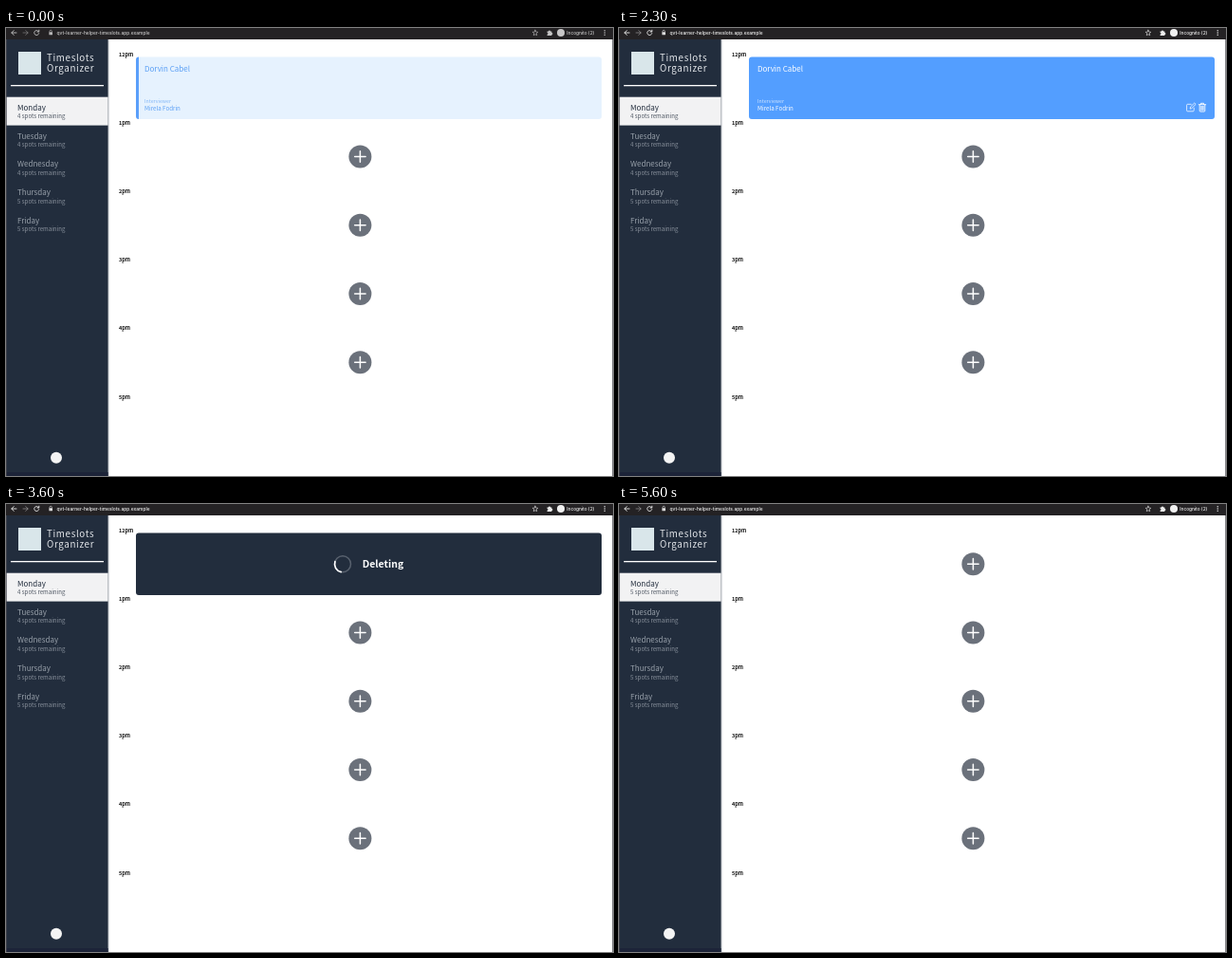
Write an HTML page that moves like this. It is 640 px wide and 472 px high and loops after 5700 ms.

```html
<!DOCTYPE html>
<html lang="en">
<head>
<meta charset="utf-8">
<title>Appointments</title>
<style>
  html, body { margin: 0; width: 100%; height: 100%; overflow: hidden; background: #fff; }
  svg { display: block; width: 640px; height: 472px; }
  text { font-family: "Noto Sans CJK JP", "Noto Sans CJK SC", "Noto Sans CJK", "Open Sans", sans-serif; }
  .chrome text { font-family: Inter, Roboto, sans-serif; font-weight: 500; fill: #f4f4f4; }
  .line { fill: none; stroke-linecap: round; stroke-linejoin: round; }
  .light { font-weight: 300; }
  .bold { font-weight: 700; }
  .hidden { display: none; }
</style>
</head>
<body>
<svg viewBox="0 0 640 472" xmlns="http://www.w3.org/2000/svg">
  <rect width="640" height="472" fill="#fff"/>

  <!-- sidebar -->
  <rect x="107" y="12" width="2.2" height="460" fill="#dfe1e4"/>
  <rect y="12" width="107.6" height="460" fill="#222d3d"/>
  <rect y="468" width="107.6" height="4" fill="#1c2338"/>
  <rect x="13" y="25" width="24" height="24" fill="#d9e6ea"/>
  <g class="light" fill="#e3e6ea" font-size="9.8" letter-spacing=".65">
    <text x="43" y="35.2">Timeslots</text>
    <text x="43" y="46.2">Organizer</text>
  </g>
  <rect x="5" y="60" width="98" height="1.3" fill="#fff"/>
  <g id="days"></g>
  <circle cx="53" cy="452.7" r="6" fill="#f4f4f4"/>
  <rect y="12" width=".7" height="460" fill="#4a4a52"/>
  <rect x="639.2" y="12" width=".8" height="460" fill="#6a6a6e"/>

  <!-- hours and free slots -->
  <g id="hours" class="bold" font-size="5.45" fill="#111"></g>
  <g id="slots"></g>

  <!-- booked -->
  <g id="booked">
    <rect id="card" x="137" y="30.5" width="491" height="65.5" rx="3"/>
    <path id="edge" d="M140 30.5v65.5a3 3 0 0 1-3-3v-59.5a3 3 0 0 1 3-3z" fill="#5a9ffa"/>
    <g id="cardText">
      <text x="146" y="46.3" font-size="8">Dorvin Cabel</text>
      <text x="146" y="79.4" font-size="5.25" class="light" opacity=".72">Interviewer</text>
      <text x="146" y="87.2" font-size="6.2">Mirela Fodrin</text>
    </g>
    <g id="tools" class="line" stroke="#fff" stroke-width=".9">
      <path opacity=".85" d="M603.2 80.3h-3.6a1 1 0 0 0-1 1v5.5a1 1 0 0 0 1 1h5.6a1 1 0 0 0 1-1v-2.6M602.2 84.8l.3-1.7 4.2-4.1 1.4 1.4-4.2 4.1z"/>
      <path id="bin" d="M611.3 80.7h7.4M613.5 80.5v-1.2h3v1.2M612.2 81v6.2a.8.8 0 0 0 .8.8h4a.8.8 0 0 0 .8-.8v-6.2M613.9 82.4v4M615 82.4v4M616.1 82.4v4"/>
    </g>
  </g>

  <!-- confirmation -->
  <g id="confirm" fill="#cf5152" text-anchor="middle">
    <g stroke="#cb5557" stroke-width=".9">
      <rect x="137.4" y="30.9" width="490.2" height="64.8" rx="2.8" fill="#fbe7e6" stroke="#b96664"/>
      <rect x="332" y="76.6" width="47.3" height="11.2" rx="5.6" fill="none"/>
      <rect x="385.6" y="76.6" width="47.3" height="11.2" rx="5.6" fill="none"/>
    </g>
    <text x="382.3" y="49.2" class="bold" font-size="10.45">Are you sure you would like to delete this appointment?</text>
    <text x="355.6" y="85.2" font-size="8">Cancel</text>
    <text x="409.2" y="85.2" font-size="8">Confirm</text>
  </g>

  <!-- deleting -->
  <g id="deleting">
    <rect x="137" y="30.5" width="491" height="65.5" rx="3" fill="#222d3d"/>
    <circle cx="355" cy="63.3" r="8.5" fill="none" stroke="#58616e" stroke-width="1.5"/>
    <path id="arc" class="line" stroke="#fff" stroke-width="1.7"/>
    <text x="375.7" y="67.1" class="bold" font-size="10.5" fill="#fff">Deleting</text>
  </g>

  <!-- browser bar -->
  <g class="chrome">
    <rect width="640" height="12" fill="#242224"/>
    <g id="bar">
      <g class="line" stroke="#eee" stroke-width=".9">
        <path d="M11 5h-5M8.2 2.6l-2.4 2.4 2.4 2.4"/>
        <path d="M18 5h5M20.8 2.6l2.4 2.4-2.4 2.4" opacity=".45"/>
        <path d="M34.4 3.7a2.5 2.5 0 1 0 .3 2M34.8 2.2v1.8h-1.8"/>
        <path d="M46 4.4v-.9a1.2 1.2 0 0 1 2.4 0v.9" stroke-width=".6"/>
        <path d="M558 2.2l.8 1.9 2 .2-1.5 1.4.4 2-1.7-1-1.7 1 .4-2-1.5-1.4 2-.2z" stroke-width=".6"/>
      </g>
      <rect x="45.4" y="4.3" width="3.6" height="3" rx=".4" fill="#ddd"/>
      <path d="M570.6 3.4h1.4a1 1 0 0 1 2 0h1.4v1.5a1 1 0 0 1 0 2v1.2h-4.8v-1.4a.9.9 0 0 0 0-1.8z" fill="#eee"/>
      <circle cx="585" cy="5" r="4" fill="#f1f1f1"/>
      <text x="53.5" y="6.7" font-size="4.9">qvt-learner-helper-timeslots.app.example</text>
      <text x="591.2" y="6.7" font-size="4.8">Incognito (2)</text>
      <g id="dots" fill="#eee"></g>
    </g>
  </g>
</svg>

<script>
const LOOP = 5700, STEP = 100;
const STEPS = [
  { at: 0, scene: 'booked', hover: false },
  { at: 800, scene: 'booked', hover: true },
  { at: 2400, scene: 'confirm' },
  { at: 3600, scene: 'deleting' },
  { at: 4800, scene: 'empty' }
];
const BIN_HOVER = 1400, FOCUS = 100;
const ROW = 72.24, SPIN = 1000;

const $ = id => document.getElementById(id);
const repeat = (n, fn) => Array.from({ length: n }, (_, i) => fn(i)).join('');

const days = [['Monday', 4], ['Tuesday', 4], ['Wednesday', 4], ['Thursday', 5], ['Friday', 5]];
$('days').innerHTML =
  '<rect y="72.7" width="107.6" height="29.9" fill="#f2f2f3"/>' +
  repeat(days.length, i => {
    const [name, spots] = days[i], y = 87 + i * 29.72;
    const [main, sub] = i ? ['#98a0aa', '#8b939e'] : ['#222d3d', '#4d5561'];
    return `<text x="12" y="${y}" font-size="8" fill="${main}">${name}</text>
      <text x="12" y="${y + 8.4}" font-size="6.1" class="light" fill="${sub}"><tspan>${spots}</tspan> spots remaining</text>`;
  });

$('hours').innerHTML = repeat(6, i =>
  `<text x="119" y="${29.5 + i * ROW}">${i || 12}pm</text>`);

$('slots').innerHTML = repeat(5, i =>
  `<g transform="translate(373.4 ${63.3 + i * ROW})">
    <circle r="12" fill="#6b717b"/>
    <path class="line" d="M-5.7 0h11.4M0 -5.7v11.4" stroke="#fff" stroke-width="1.5"/>
  </g>`);

$('dots').innerHTML = repeat(3, i => `<circle cx="631.2" cy="${2.7 + i * 2.3}" r=".7"/>`);

const firstSlot = $('slots').firstElementChild;
const mondaySpots = $('days').querySelector('tspan');
const show = (el, on) => el.classList.toggle('hidden', !on);

function arcPath(mid) {
  const point = deg => {
    const a = deg * Math.PI / 180;
    return `${355 + 8.5 * Math.cos(a)} ${63.3 + 8.5 * Math.sin(a)}`;
  };
  return `M${point(mid - 48)}A8.5 8.5 0 0 1 ${point(mid + 48)}`;
}

function draw(time) {
  const t = Math.floor((time % LOOP) / STEP) * STEP;
  const now = STEPS.filter(s => s.at <= t).pop();
  const empty = now.scene === 'empty';

  for (const id of ['booked', 'confirm', 'deleting']) show($(id), id === now.scene);
  show(firstSlot, empty);
  mondaySpots.textContent = empty ? 5 : 4;
  $('bar').setAttribute('opacity', t < FOCUS ? 0.8 : 1);

  $('card').setAttribute('fill', now.hover ? '#539eff' : '#e6f2fe');
  $('cardText').setAttribute('fill', now.hover ? '#fff' : '#5a9ff5');
  show($('edge'), !now.hover);
  show($('tools'), now.hover);
  $('bin').setAttribute('opacity', t < BIN_HOVER ? 0.8 : 1);

  $('arc').setAttribute('d', arcPath(150 + 360 * (t - 3600) / SPIN));
}

const start = performance.now();
function tick() {
  draw(performance.now() - start);
  requestAnimationFrame(tick);
}
tick();
</script>
</body>
</html>
```
